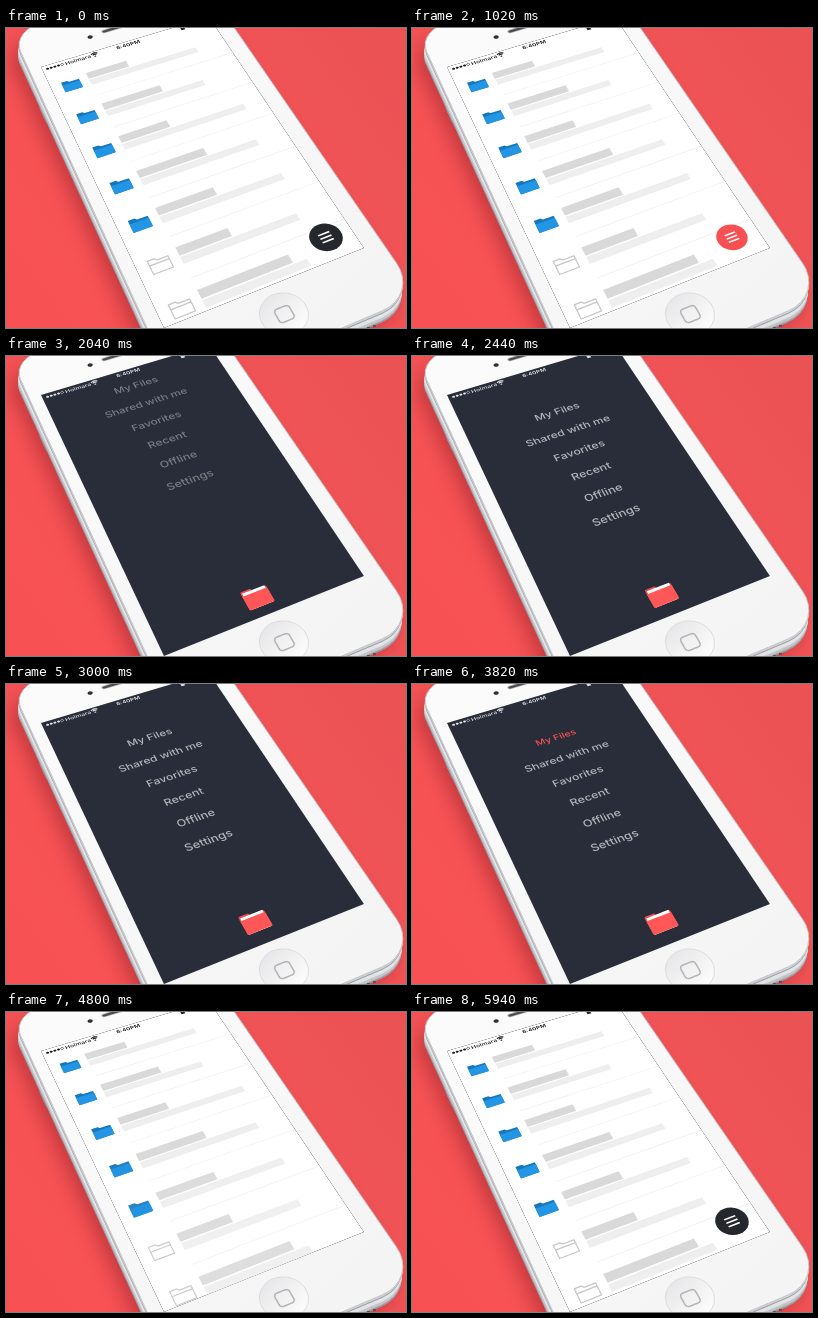
Recreate the animation shown at these times as an HTML page with a canvas. Size 400x300 px, loop 6 s.

```html
<!DOCTYPE html>
<html lang="en">
<head>
<meta charset="utf-8">
<title>Folder menu</title>
<style>
html, body { margin: 0; width: 100%; height: 100%; overflow: hidden; background: #f15254; }
canvas { display: block; width: 400px; height: 300px; }
</style>
</head>
<body>
<canvas id="stage"></canvas>
<script>
const LOOP = 6000, W = 320, H = 568;
const FONT = 'Inter, "Open Sans", sans-serif';
const DARK = '#282d39', RED = [247, 80, 83], INK = [36, 40, 44];
const MENU = ['My Files', 'Shared with me', 'Favorites', 'Recent', 'Offline', 'Settings'];
// right ends of the title bar and the detail bar in each row
const ROWS = [[140, 265], [171, 243], [151, 283], [182, 268], [163, 273], [151, 258], [212, 234]];

const dpr = window.devicePixelRatio || 1;
function setup(cv) {
  cv.width = 400 * dpr;
  cv.height = 300 * dpr;
  const g = cv.getContext('2d');
  g.scale(dpr, dpr);
  return g;
}
const stage = setup(document.getElementById('stage'));
const phone = document.createElement('canvas');
let c = setup(phone);

const clamp = v => Math.max(0, Math.min(1, v));
const lerp = (a, b, k) => a + (b - a) * k;
const inOut = v => (v = clamp(v), v < .5 ? 4 * v ** 3 : 1 - 4 * (1 - v) ** 3);
const mix = (a, b, k) => `rgb(${a.map((v, i) => Math.round(lerp(v, b[i], k)))})`;
const dip = ms => 1 - .1 * Math.sin(Math.PI * clamp(ms / 520));
function spring(ms, decay = 5.4, freq = 5.8) {
  if (ms <= 0) return 0;
  const t = ms / 1000, x = freq * t;
  return 1 - Math.exp(-decay * t) * (Math.cos(x) + decay / freq * Math.sin(x));
}

// flat phone-screen units -> stage pixels
let view = { s: 1, x: 0, y: 0 };
function project(x, y) {
  const u = (view.x + x * view.s) / W, v = (view.y + y * view.s) / H;
  const w = 1 + .0587 * u - .2055 * v;
  return [(179.9 * u + 90.5 * v + 35) / w, (-50.65 * u + 199.35 * v + 39) / w];
}
function within(s, x, y, draw) {
  const old = view;
  view = { s: old.s * s, x: old.x + x * old.s, y: old.y + y * old.s };
  draw();
  view = old;
}
function path(pts, open) {
  c.beginPath();
  pts.forEach(([x, y], i) => c[i ? 'lineTo' : 'moveTo'](...project(x, y)));
  if (!open) c.closePath();
}
function fill(pts, color) {
  path(pts);
  c.fillStyle = color;
  c.fill();
}
function line(pts, color, width, open) {
  path(pts, open);
  c.strokeStyle = color;
  c.lineWidth = width;
  c.stroke();
}
const box = (x, y, w, h) => [[x, y], [x + w, y], [x + w, y + h], [x, y + h]];
function arc(x, y, r, from = 0, to = 2 * Math.PI, n = 28) {
  return Array.from({ length: n + 1 }, (_, i) => {
    const a = lerp(from, to, i / n);
    return [x + r * Math.cos(a), y + r * Math.sin(a)];
  });
}
function round(x, y, w, h, r) {
  const q = Math.PI / 2;
  return [[x + r, y + r], [x + w - r, y + r], [x + w - r, y + h - r], [x + r, y + h - r]]
    .flatMap(([a, b], i) => arc(a, b, r, (i + 2) * q, (i + 3) * q, 8));
}
function text(str, x, y, size, color, weight = 500, align = 'center') {
  const o = project(x, y), a = project(x + 1, y), b = project(x, y + 1);
  c.save();
  c.transform(a[0] - o[0], a[1] - o[1], b[0] - o[0], b[1] - o[1], o[0], o[1]);
  c.font = `${weight} ${size}px ${FONT}`;
  c.textAlign = align;
  c.textBaseline = 'middle';
  c.fillStyle = color;
  c.fillText(str, 0, 0);
  c.restore();
}

function drawPhone() {
  const bg = c.createLinearGradient(0, 300, 400, 0);
  bg.addColorStop(0, '#f95153');
  bg.addColorStop(.6, '#f15355');
  bg.addColorStop(1, '#ea5254');
  c.fillStyle = bg;
  c.fillRect(0, 0, 400, 300);

  const body = round(-21, -113, 371, 785, 60);
  c.save();
  c.translate(-8, 16);
  c.filter = 'blur(9px)';
  fill(body, 'rgba(120,20,30,.38)');
  c.restore();

  c.lineCap = 'round';
  for (const [x, y, dx, dy] of [[26, 55, 5, 11], [36, 80, 6, 13], [49, 105, 6, 15]]) {
    for (const [color, width] of [['#8f9196', 5], ['#dcdde0', 3]]) {
      c.beginPath();
      c.moveTo(x, y);
      c.lineTo(x + dx, y + dy);
      c.strokeStyle = color;
      c.lineWidth = width;
      c.stroke();
    }
  }
  for (let k = 12; k > 0; k--) {
    c.save();
    c.translate(-.1 * k, k);
    fill(body, k > 10 ? '#9c9ea3' : k > 7 ? '#c3c5c9' : k > 3 ? '#e2e3e5' : k > 2 ? '#96989d' : '#cfd0d3');
    c.restore();
  }
  const face = c.createLinearGradient(60, 0, 340, 300);
  face.addColorStop(0, '#fbfbfb');
  face.addColorStop(1, '#f4f4f5');
  fill(body, face);
  line(body, '#c4c6ca', 1);

  c.fillStyle = '#55575c';
  for (const [x, y] of [[361, 299], [367, 297]]) c.fillRect(x, y, 3, 2);

  fill(arc(103, -38, 4.6), '#2b2d33');
  fill(round(126, -47, 68, 10, 5), '#b9babd');
  fill(round(128, -45, 64, 6, 3), '#4b4d52');

  const [hx, hy] = project(161, 618);
  const shade = c.createLinearGradient(hx - 18, hy - 18, hx + 18, hy + 18);
  shade.addColorStop(0, '#e6e6e8');
  shade.addColorStop(1, '#fdfdfd');
  fill(arc(161, 618, 34.5), shade);
  line(arc(161, 618, 34.5), '#d7d8da', .8);
  line(round(150, 607, 23, 23, 5), '#b2b3b6', 1.5);
}

function statusBar(k) {
  const ink = mix([222, 224, 228], [30, 30, 32], k);
  for (let i = 0; i < 5; i++) {
    const dot = arc(9 + i * 6.6, 9, 2.6, 0, 2 * Math.PI, 12);
    i < 4 ? fill(dot, ink) : line(dot, ink, .6);
  }
  text('Holmara', 41, 10, 11.6, ink, 500, 'left');
  fill(arc(95, 13, 1.6), ink);
  for (const r of [5, 8.6]) line(arc(95, 13, r, -2.35, -.8, 8), ink, 1.1, true);
  text('6:40PM', 158, 9.5, 11.6, ink, 600);
  fill(box(260, 3, 7, 10), ink);
}

const folderShape = [[-15.5, -12.5], [-5, -12.5], [-2, -9], [15.5, -9], [15.5, 12.5], [-15.5, 12.5]];
function rowIcon(filled) {
  if (filled) {
    fill(folderShape, '#1777bd');
    fill(round(-15.5, -5, 31, 17.5, 1.5), '#2295e4');
  } else {
    c.lineJoin = 'round';
    line(folderShape, '#c6c6c6', 1.2);
    line([[-15.5, -3.5], [15.5, -3.5]], '#c6c6c6', 1.2, true);
  }
}

function drawRow(i, dy, alpha) {
  if (alpha <= 0) return;
  const y = 64 + 80.8 * i + dy, [a, b] = ROWS[i];
  c.globalAlpha = alpha;
  within(1, 35, y, () => rowIcon(i < 5));
  fill(box(66, y - 18, a - 66, 16), '#d9d9d9');
  fill(box(66, y + .5, b - 66, 13.5), '#eeeeee');
  fill(box(66, y + 40, W - 66, 1.5), '#f0f0f0');
  c.globalAlpha = 1;
}

function drawButton(t) {
  const back = t > 4000;
  const k = back ? spring(t - 4850) : dip(t - 620);
  if (k <= .01) return;
  const color = mix(INK, RED, back ? 0 : clamp((t - 620) / 160));
  within(k, 278, 527, () => {
    fill(arc(0, 0, 25.3), color);
    for (const y of [-7, 0, 7]) fill(box(-9.5, y - 1.4, 19, 2.8), '#fff');
  });
}

function drawList(t) {
  fill(box(0, 0, W, H), '#fff');
  for (let i = 0; i < 7; i++) {
    if (t < 4000) drawRow(i, 0, 1);
    else {
      const age = t - 4385 - 103 * (1 - (1 - i / 6) ** 2);
      drawRow(i, 550 * (1 - spring(age, 10.1, 7.57)), clamp(age / 350) ** 1.3);
    }
  }
  drawButton(t);
}

function drawMenu(t) {
  const show = clamp((t - 1890) / 260) * (1 - clamp((t - 4170) / 150));
  if (show <= 0) return;
  c.globalAlpha = show;
  MENU.forEach((label, i) => {
    const dy = -110 * (1 - spring(t - 1890 - i * 4));
    const k = i ? 1 : dip(t - 3560);
    const hot = i ? 0 : clamp((t - 3560) / 160);
    text(label, 159, 112 + 50 * i + dy, 20.4 * k, mix([178, 181, 186], RED, hot));
  });
  c.globalAlpha = 1;
}

// place of the folder and of the list card at time t
function pose(t) {
  if (t < 4180) {
    const e = inOut((t - 1160) / 290), q = inOut((t - 1400) / 220);
    const fy = 309 + 219 * spring(t - 1600);
    return {
      fy, s: lerp(lerp(1, .153, e), .1125, q),
      cy: lerp(lerp(284, 254, e), fy + 18, q),
      flap: clamp((t - 1400) / 100)
    };
  }
  const e = inOut((t - 4180) / 428);
  return {
    fy: 528 + 29 * e, s: lerp(.1125, 1, e), cy: lerp(546, 284, e),
    flap: 1 - clamp((t - 4180) / 100)
  };
}

function drawFolder(fy, flap, card) {
  within(1, 160, fy, () => {
    fill(round(-20, -17, 17, 12, 2), '#f04c50');
    fill(round(-20, -13, 40, 30, 2), '#f04c50');
  });
  card();
  if (flap > 0) within(1, 160, fy, () => {
    const h = 26 * flap;
    fill(round(-20, 17 - h, 40, h, Math.min(2, h / 2)), '#ff5658');
  });
}

function frame(t) {
  c.drawImage(phone, 0, 0, 400, 300);
  const { fy, s, cy, flap } = pose(t);
  c.save();
  path(box(0, 0, W, H));
  c.clip();
  fill(box(-2, -2, W + 4, H + 4), DARK);
  drawMenu(t);

  const card = () => {
    c.save();
    path(box(-60, -60, W + 120, fy + 77 + (1 - flap) * 400));
    c.clip();
    within(s, 160 - 160 * s, cy - 284 * s, () => drawList(t));
    c.restore();
  };
  if (t > 1250 && t < 4700) drawFolder(fy, flap, card);
  else card();
  statusBar(clamp((s - .93) / .06));
  c.restore();
}

drawPhone();
c = stage;
const start = performance.now();
function tick() {
  frame((performance.now() - start) % LOOP);
  requestAnimationFrame(tick);
}
tick();
</script>
</body>
</html>
```
